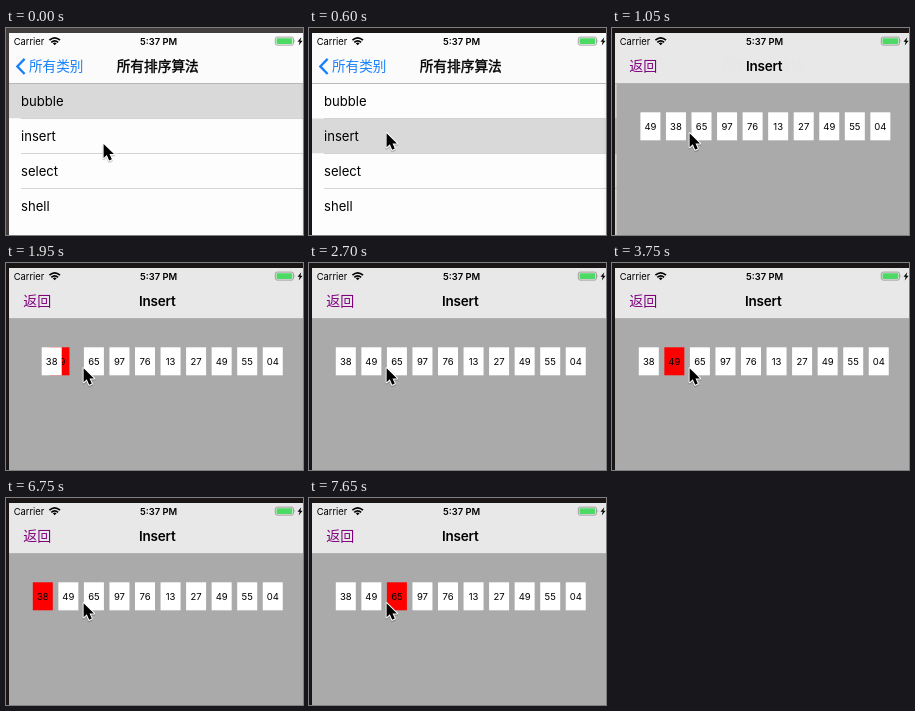
Write an HTML page that moves like this. It is 297 by 207 pixels and loops after 8 s.

```html
<!DOCTYPE html>
<html lang="zh">
<head>
<meta charset="utf-8">
<style>
html, body { margin: 0; width: 100%; height: 100%; overflow: hidden; background: #1b1616; }
svg { display: block; width: 297px; height: 207px; font-family: Inter, "Noto Sans CJK SC", "Noto Sans CJK", sans-serif; }
.row { font-size: 13.1px; }
.cell { font-size: 9.5px; text-anchor: middle; }
.title { font-size: 13.5px; font-weight: 600; text-anchor: middle; }
.status { font-size: 9.4px; }
.nav { font-size: 13.6px; }
#oldTitle { font-size: 13.7px; font-weight: 400; stroke: #000; stroke-width: .4px; }
</style>
</head>
<body>
<svg viewBox="0 0 297 207">
  <defs>
    <clipPath id="screen"><rect x="3" y="5" width="298" height="202"/></clipPath>
    <clipPath id="labelMask"><rect x="19.5" y="28" width="120" height="24"/></clipPath>
    <linearGradient id="shade"><stop offset="0" stop-opacity="0"/><stop offset="1" stop-opacity=".1"/></linearGradient>
    <linearGradient id="blur"><stop offset="0" stop-color="#e8e8e8" stop-opacity="0"/><stop offset="1" stop-color="#e8e8e8"/></linearGradient>
  </defs>
  <rect id="frame" width="297" height="207"/>
  <g clip-path="url(#screen)">
    <rect x="3" y="5" width="298" height="202" fill="#fdfdfd"/>
    <g id="list"></g>
    <rect id="dim" x="3" y="55" width="298" height="152"/>
    <g id="page">
      <rect x="-4" y="56" width="7" height="151" fill="url(#shade)"/>
      <rect x="3" y="55" width="298" height="152" fill="#aaa"/>
      <g id="cells"></g>
    </g>
    <rect id="bar" x="3" y="5" width="298" height="50.5"/>
    <g id="barTint">
      <rect x="-27" y="5" width="30" height="50.5" fill="url(#blur)"/>
      <rect x="3" y="5" width="298" height="50.5" fill="#e8e8e8"/>
    </g>
    <g id="ghost" fill="#fff">
      <rect x="15" y="14" width="148" height="41" opacity=".5"/>
      <rect x="43" y="18" width="87" height="32" opacity=".8"/>
    </g>
    <rect x="3" y="55" width="298" height=".8" fill="#a9a9a9"/>
    <g id="back" class="nav" fill="#1680fb">
      <path d="M18.6 30.9 11.3 38.4l7.3 7.6" fill="none" stroke="#1680fb" stroke-width="2.3"/>
      <g clip-path="url(#labelMask)"><text id="backLabel" x="23" y="43.1">所有类别</text></g>
    </g>
    <text id="oldTitle" class="title" x="151.7" y="43.1">所有排序算法</text>
    <text id="newBack" class="nav" x="17.2" y="43.3" fill="#800080" style="font-size:14px">返回</text>
    <text id="newTitle" class="title" y="43.2" letter-spacing="-.2">Insert</text>
    <text class="status" x="7.7" y="16.5">Carrier</text>
    <g fill="none" stroke="#000" stroke-width="1.7">
      <path d="M43.4 12.2Q48.7 7.5 54 12.2M45.3 14.3Q48.7 11.3 52.1 14.3"/>
      <path d="M46.8 15.2Q48.7 13.8 50.6 15.2L48.7 17.2Z" fill="#000" stroke="none"/>
    </g>
    <text class="status" x="152.7" y="16.5" text-anchor="middle" font-weight="600">5:37 PM</text>
    <rect x="269.3" y="9.1" width="18.2" height="8" rx="1.8" fill="none" stroke="#8f8f8f" stroke-width=".8"/>
    <rect x="270.5" y="10.3" width="15.8" height="5.6" rx=".8" fill="#4cd964"/>
    <path d="M288.6 11.6q1.3 1.4 0 3z" fill="#8f8f8f"/>
    <path d="M295.3 9.2 291.5 13.8h2.2l-1 3.8 3.9-4.8h-2.2z"/>
  </g>
  <g id="cursor" stroke-linejoin="round">
    <path d="M.6 1.8V15.8L3.8 12.9 6.2 18.4 8.8 17.2 6.5 12H11Z" stroke="#000" stroke-width="2.4" opacity=".18"/>
    <path d="M.6.6V14.6L3.8 11.7 6.2 17.2 8.8 16 6.5 10.8H11Z" stroke="#fff" stroke-width="2" paint-order="stroke"/>
  </g>
</svg>
<script>
const $ = id => document.getElementById(id);
const LOOP = 8000, STEP = 150, WIDTH = 298;
const TAP = 600, PUSH = 667.4, SWAP = 1655, SWAP_MS = 500;
const LEFT = 26.8, PITCH = 25.55;
const POINTER = [[97, 115.3], [86, 110], [83, 108], [77, 104.6]];
// [start, end, slot] of each highlighted slot after the swap
const MARKS = [
  [3150, 3750, 0], [3750, 4200, 1],
  [4650, 5250, 0], [5250, 5700, 1], [5700, 6150, 2],
  [6750, 7200, 0], [7200, 7650, 1], [7650, LOOP, 2]
];

function add(parent, tag, attrs, text) {
  const el = document.createElementNS("http://www.w3.org/2000/svg", tag);
  for (const k in attrs) el.setAttribute(k, attrs[k]);
  if (text) el.textContent = text;
  parent.appendChild(el);
  return el;
}
const set = (id, name, value) => $(id).setAttribute(name, value);
const shift = (el, x, y = 0) => el.setAttribute("transform", `translate(${x} ${y})`);

const rows = ["bubble", "insert", "select", "shell"].map((name, i) => {
  const y = 55.5 + 35 * i;
  const bg = add($("list"), "rect", { x: 3, y, width: WIDTH, height: 35 });
  if (i) add($("list"), "rect", { x: 15, y: y - 0.4, width: WIDTH, height: 0.8, fill: "#cbcacf" });
  add($("list"), "text", { x: 15, y: y + 22, class: "row" }, name);
  return bg;
});

const cells = ["49", "38", "65", "97", "76", "13", "27", "49", "55", "04"].map(value => {
  const g = add($("cells"), "g", {});
  const box = add(g, "rect", { y: 84.3, width: 20, height: 28 });
  add(g, "text", { x: 10, y: 101.9, class: "cell" }, value);
  return { g, box };
});
// the second cell passes above the first
$("cells").insertBefore(cells[0].g, $("cells").firstChild);

function easeInOut(x) {
  if (x <= 0) return 0;
  if (x >= 1) return 1;
  let lo = 0, hi = 1;
  for (let i = 0; i < 24; i++) {
    const u = (lo + hi) / 2, v = 1 - u;
    if (3 * v * v * u * 0.42 + 3 * v * u * u * 0.58 + u * u * u < x) lo = u; else hi = u;
  }
  return lo * lo * (3 - 2 * lo);
}

// share of the push still to travel, critically damped
function remaining(t) {
  const k = Math.max(0, t - PUSH) * 0.0192;
  return (1 + k) * Math.exp(-k);
}

function drawPush(t) {
  const r = remaining(t), p = 1 - r;
  set("frame", "fill", t < TAP ? "#423e3e" : "#1b1616");
  const selected = t < TAP ? 0 : 1;
  rows.forEach((row, i) => row.setAttribute("fill", i === selected ? "#d9d9d9" : "#fdfdfd"));
  shift($("list"), -0.3 * WIDTH * p);
  set("dim", "opacity", 0.1 * p);
  shift($("page"), WIDTH * r);
  shift($("barTint"), WIDTH * r);
  set("barTint", "opacity", Math.min(1, 4 * p));
  const light = Math.round(251 - 19 * Math.min(1, p * 1.2));
  set("bar", "fill", `rgb(${light},${light},${light})`);
  set("ghost", "opacity", 2 * p * r);
  set("back", "opacity", r);
  shift($("backLabel"), -66 * p);
  set("oldTitle", "opacity", Math.min(1, 1.18 * r));
  set("newBack", "opacity", p);
  set("newTitle", "opacity", p);
  set("newTitle", "x", 151.2 + 181 * r);
}

function drawCells(t) {
  const s = easeInOut((t - SWAP) / SWAP_MS);
  const swapped = s === 1;
  let hot = t >= 1650 && t < 2700 ? 0 : -1;
  const mark = MARKS.find(([from, to]) => t >= from && t < to);
  if (mark) hot = swapped && mark[2] < 2 ? 1 - mark[2] : mark[2];
  cells.forEach(({ g, box }, i) => {
    const slot = i === 0 ? s : i === 1 ? 1 - s : i;
    shift(g, LEFT + PITCH * slot);
    box.setAttribute("fill", i === hot ? "#f00" : "#fff");
  });
}

function draw(now) {
  const t = Math.floor(now % LOOP / STEP) * STEP;
  drawPush(t);
  drawCells(t);
  shift($("cursor"), ...POINTER[Math.min(3, t / STEP)]);
}

const start = performance.now();
function tick() {
  draw(performance.now() - start);
  requestAnimationFrame(tick);
}
tick();
</script>
</body>
</html>
```
